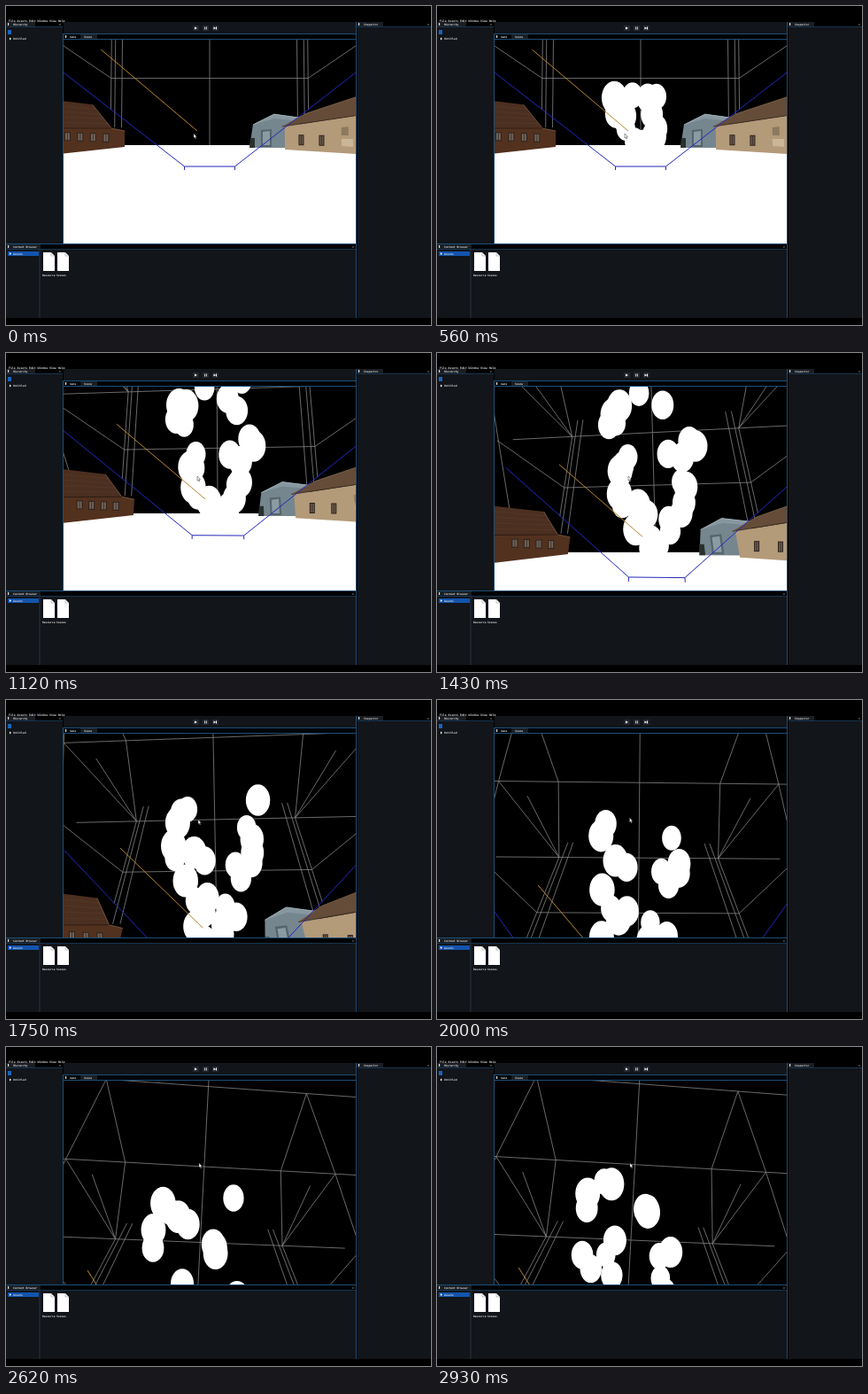
Write an HTML page with a canvas that moves like this. It is 480 px wide and 360 px high and loops after 3 s.

```html
<!DOCTYPE html>
<html lang="en">
<head>
<meta charset="utf-8">
<title>Scene editor with particles</title>
<style>
html, body { margin: 0; width: 100%; height: 100%; overflow: hidden; background: #000; }
canvas { display: block; }
</style>
</head>
<body>
<canvas id="stage" width="480" height="360"></canvas>
<script>
const c = document.getElementById('stage').getContext('2d');
const PANEL = '#12151a', EDGE = '#1c4f78';
const CX = 230, CY = 153, FOCAL = 200, NEAR = 0.05;
const LAST = 47, STEP = 6.25;   // 48 pictures, one every 6.25 hundredths of a second

// Camera path: step, pitch, yaw, pointer x, pointer y.
const PATH = [
  [0, 0.02, 0, 212, 144], [9, 0.02, 0, 212, 144], [18, 0.139, 0.045, 216, 139],
  [23, 0.345, 0.08, 216, 139], [28, 0.56, 0.036, 217, 135],
  [36, 0.99, -0.06, 218, 131], [47, 0.965, -0.066, 218, 131]
];
let pitch, yaw, pointer;
function aim(k) {
  const i = Math.max(1, PATH.findIndex(p => p[0] >= k));
  const a = PATH[i - 1], b = PATH[i], u = (k - a[0]) / (b[0] - a[0]);
  const [, p, y, px, py] = a.map((v, j) => v + (b[j] - v) * u);
  pitch = p;
  yaw = y;
  pointer = [px, py];
}

// World axes: x right, y up, z ahead.
function toCamera([x, y, z]) {
  const x1 = x * Math.cos(yaw) + z * Math.sin(yaw);
  const z1 = z * Math.cos(yaw) - x * Math.sin(yaw);
  return [x1, y * Math.cos(pitch) - z1 * Math.sin(pitch), z1 * Math.cos(pitch) + y * Math.sin(pitch)];
}
const flat = ([x, y, z]) => [CX + FOCAL * x / z, CY - FOCAL * y / z];
const project = p => flat(toCamera(p));
// World point seen at a screen place while the camera looks level.
const spot = (x, y) => [(x - CX) / FOCAL, (157 - y) / FOCAL, 1];
const place = (x, y) => project(spot(x, y));

function trace(pts) {
  c.beginPath();
  for (const [x, y] of pts) c.lineTo(x, y);
}
function fill(color, pts) { trace(pts); c.fillStyle = color; c.fill(); }
function stroke(color, pts, w = 1) {
  trace(pts);
  c.strokeStyle = color;
  c.lineWidth = w;
  c.stroke();
}
function box(color, x, y, w, h) { c.fillStyle = color; c.fillRect(x, y, w, h); }
function label(s, x, y, size = 3) {
  c.font = `bold ${size}px "DejaVu Sans Mono", monospace`;
  c.fillStyle = '#dcdcdc';
  c.fillText(s, x, y);
}

// Straight edge in the world, cut at the near plane.
function edge(color, from, to, w = 0.8) {
  let a = toCamera(from), b = toCamera(to);
  if (a[2] < b[2]) [a, b] = [b, a];
  if (a[2] < NEAR) return;
  if (b[2] < NEAR) {
    const u = (a[2] - NEAR) / (a[2] - b[2]);
    b = a.map((v, i) => v + (b[i] - v) * u);
  }
  stroke(color, [flat(a), flat(b)], w);
}

const SIDE = 0.56, ROW = 0.38, TOP = 1.12, BACK = 0.62, FRONT = 0.11, WING = 0.97;
function drawCage() {
  const wire = (a, b) => edge('#858585', a, b);
  const across = (x, y, z) => wire([-x, y, z], [x, y, z]);
  across(SIDE, ROW, 1);
  across(1, 2 * ROW, 1);
  across(2, TOP, BACK);
  across(2, TOP, FRONT);
  wire([0, 0, 1], [0, 2 * ROW, 1]);
  wire([0, 2 * ROW, 1], [0, TOP, BACK]);
  wire([0, TOP, BACK], [0, TOP, 0]);
  for (const s of [-SIDE, SIDE]) {
    const wing = [s * WING / SIDE, TOP, BACK];
    for (const y of [ROW, 2 * ROW]) wire([s, y, 1], [s, y, 0.5]);
    for (const x of [0.89, 0.96]) wire([s * x, 0.1, 1], [s * x, 0.9, 1]);
    wire([s, 0.2, 1], [s, 2 * ROW, 1]);
    for (const top of [[s, TOP, BACK], wing]) {
      wire([s, 2 * ROW, 1], top);
      wire(top, [s, TOP, FRONT]);
    }
    wire([s * 1.55, 0.2, 1], wing);
  }
}

// Row of windows along a wall, from a to b.
function windows(color, a, b, n, w, h) {
  for (let i = 0; i < n; i++) {
    const u = (i + 0.5) / n;
    const [x, y] = place(a[0] + (b[0] - a[0]) * u, a[1] + (b[1] - a[1]) * u);
    box('#2b211c', x - w / 2 - 1, y - h / 2 - 1, w + 2, h + 2);
    box(color, x - w / 2, y - h / 2, w, h);
    box('#3f332c', x - 0.5, y - h / 2, 1, h);
  }
}
const shape = (color, ...pts) => fill(color, pts.map(p => place(...p)));
const seam = (color, ...pts) => stroke(color, pts.map(p => place(...p)), 0.8);

function drawBuildings() {
  shape('#52311f', [-40, 138], [119, 138], [134, 141], [134, 159], [-40, 178]);
  shape('#4b2f20', [-40, 94], [97, 111], [119, 138], [-40, 138]);
  for (let u = 0.2; u < 1; u += 0.2) {
    seam('#573927', [-40, 94 + 44 * u], [97 + 22 * u, 111 + 27 * u]);
  }
  seam('#80604a', [97, 111], [119, 138], [134, 141]);
  seam('#2b1a12', [-40, 138], [119, 138]);
  windows('#70645a', [62, 147], [120, 149], 4, 5, 8);

  shape('#76868f', [275, 160], [279, 134], [303, 122], [332, 126], [332, 160]);
  shape('#8797a0', [279, 134], [303, 122], [332, 126], [332, 130], [303, 127]);
  seam('#a9b8bf', [279, 134], [303, 122], [332, 126]);
  shape('#56656d', [288, 159], [288, 140], [300, 139], [300, 159]);
  shape('#8b9aa3', [290, 157], [290, 142], [298, 141], [298, 157]);
  shape('#29312e', [275, 160], [276, 149], [281, 149], [281, 160]);

  shape('#b39a79', [315, 136], [440, 117], [440, 170], [315, 162]);
  shape('#644c38', [312, 136], [340, 121], [440, 88], [440, 117]);
  seam('#846750', [312, 136], [340, 121], [440, 88]);
  seam('#3b2d22', [312, 136], [440, 117]);
  windows('#6b5c4b', [322, 151], [368, 152], 2, 4, 10);
  shape('#8e7860', [379, 137], [387, 136], [387, 146], [379, 146]);
  shape('#cbb698', [379, 150], [392, 150], [392, 159], [379, 158]);
}

function drawFrustum() {
  const blue = '#2228bc';
  for (const s of [-1, 1]) {
    const near = [s * 0.142, -0.12, 1];
    edge(blue, near, [s * 0.99, 0.535, 1], 1);
    edge(blue, near, [s * 0.142, -0.14, 1], 1);
  }
  edge(blue, [-0.142, -0.12, 1], [0.142, -0.12, 1], 1);
}

const rand = n => {
  const v = Math.sin(n * 12.9898) * 43758.5453;
  return v - Math.floor(v);
};
// Fountain of discs: they spread sideways and gain speed as they climb.
function drawParticles(k) {
  c.fillStyle = '#fff';
  for (let i = 0; i * 0.8 < k; i++) {
    const age = k - i * 0.8;
    if (age > 17 + 10 * rand(i + 0.1)) continue;
    const rise = (0.75 + 0.4 * rand(i + 0.2)) * (0.03 * age + 0.001 * age * age);
    const side = (i % 2 ? 1 : -1) * (0.2 + 0.8 * rand(i + 0.3));
    const [x, y] = project([side * 0.38 * Math.sqrt(rise), rise, 1]);
    const r = 10.5 + 4 * rand(i + 0.4);
    c.beginPath();
    c.ellipse(x, y, r, r * 1.3, 0, 0, Math.PI * 2);
    c.fill();
  }
}

function drawScene(k) {
  c.save();
  c.beginPath();
  c.rect(65, 38, 330, 230);
  c.clip();
  box('#000', 65, 38, 330, 230);
  drawCage();
  box('#fff', 65, CY + FOCAL * Math.tan(pitch), 330, 300);
  drawBuildings();
  drawFrustum();
  drawParticles(k);
  edge('#b98531', spot(106, 48), spot(216, 141), 1);
  c.restore();
}

function tab(x, y, w, text) {
  box('#1a1e24', x, y, w, 5);
  box('#ddd', x + 2, y + 1, 1.2, 3);
  label(text, x + 8, y + 4);
}
const arrow = (x, y, w) => fill('#fff', [[x, y - 1.5], [x + w, y], [x, y + 1.5]]);
function fileIcon(x, name) {
  fill('#fff', [[x, 278], [x + 9, 278], [x + 13, 282], [x + 13, 299], [x, 299]]);
  stroke('#999', [[x + 9, 278], [x + 9, 282], [x + 13, 282]], 0.6);
  label(name, x - 1, 305);
}
function drawPanels() {
  box('#000', 0, 0, 480, 360);
  label('File Assets Edit Window View Help', 3, 17.5, 3.2);
  box(PANEL, 0, 24, 64, 244);
  box(PANEL, 65, 18, 330, 13);
  box(PANEL, 397, 24, 83, 328);
  box(PANEL, 0, 275, 395, 77);
  tab(0, 18, 33, 'Hierarchy');
  tab(396, 18, 30, 'Inspector');
  tab(0, 269, 39, 'Content Browser');
  for (const [x, y, w] of [[0, 23, 64], [397, 23, 83], [0, 274, 395]]) box('#17344d', x, y, w, 1);
  for (const [x, y] of [[60, 22], [476, 22], [391, 36], [391, 273]]) label('×', x, y);

  box('#1765bd', 2, 27, 4, 5);
  arrow(4, 37, 2);
  label('Untitled', 8, 38);

  for (const x of [211, 222, 233]) box('#23272d', x, 22, 7, 6);
  arrow(213, 25, 3);
  box('#fff', 224.3, 23.5, 0.8, 3);
  box('#fff', 225.9, 23.5, 0.8, 3);
  arrow(234.5, 25, 2.5);
  box('#fff', 237, 23.5, 1, 3);

  box('#000', 65, 32, 330, 6);
  box('#1a1e24', 84, 32, 19, 5);
  box('#ddd', 67, 33, 1.2, 3);
  label('Game', 72, 36);
  label('Scene', 88, 36);

  box('#1354ae', 2, 277, 35, 5);
  arrow(4, 279.5, 2);
  label('Assets', 8, 280.7);
  box('#2b3440', 37.5, 275, 1, 77);
  fileIcon(42, 'Resource');
  fileIcon(58, 'Scenes');
}
function drawEdges() {
  c.strokeStyle = EDGE;
  c.lineWidth = 1;
  c.strokeRect(64.5, 31.5, 331, 237);
  box(EDGE, 65, 37, 330, 1);
  box(EDGE, 0, 268, 395, 1);
  box(EDGE, 395, 18, 1, 334);
}
function drawPointer([x, y]) {
  const tip = [[x, y], [x, y + 5], [x + 1.1, y + 4], [x + 2, y + 6], [x + 2.8, y + 5.5], [x + 2, y + 3.7], [x + 3.4, y + 3.6], [x, y]];
  fill('#fff', tip);
  stroke('#333', tip, 0.5);
}

const began = performance.now();
function draw() {
  const t = Math.max(0, performance.now() - began) % 3000;
  const k = Math.min(LAST, Math.ceil((Math.floor(t / 10) + 1) / STEP) - 1);
  aim(k);
  drawPanels();
  drawScene(k);
  drawEdges();
  drawPointer(pointer);
  requestAnimationFrame(draw);
}
draw();
</script>
</body>
</html>
```
